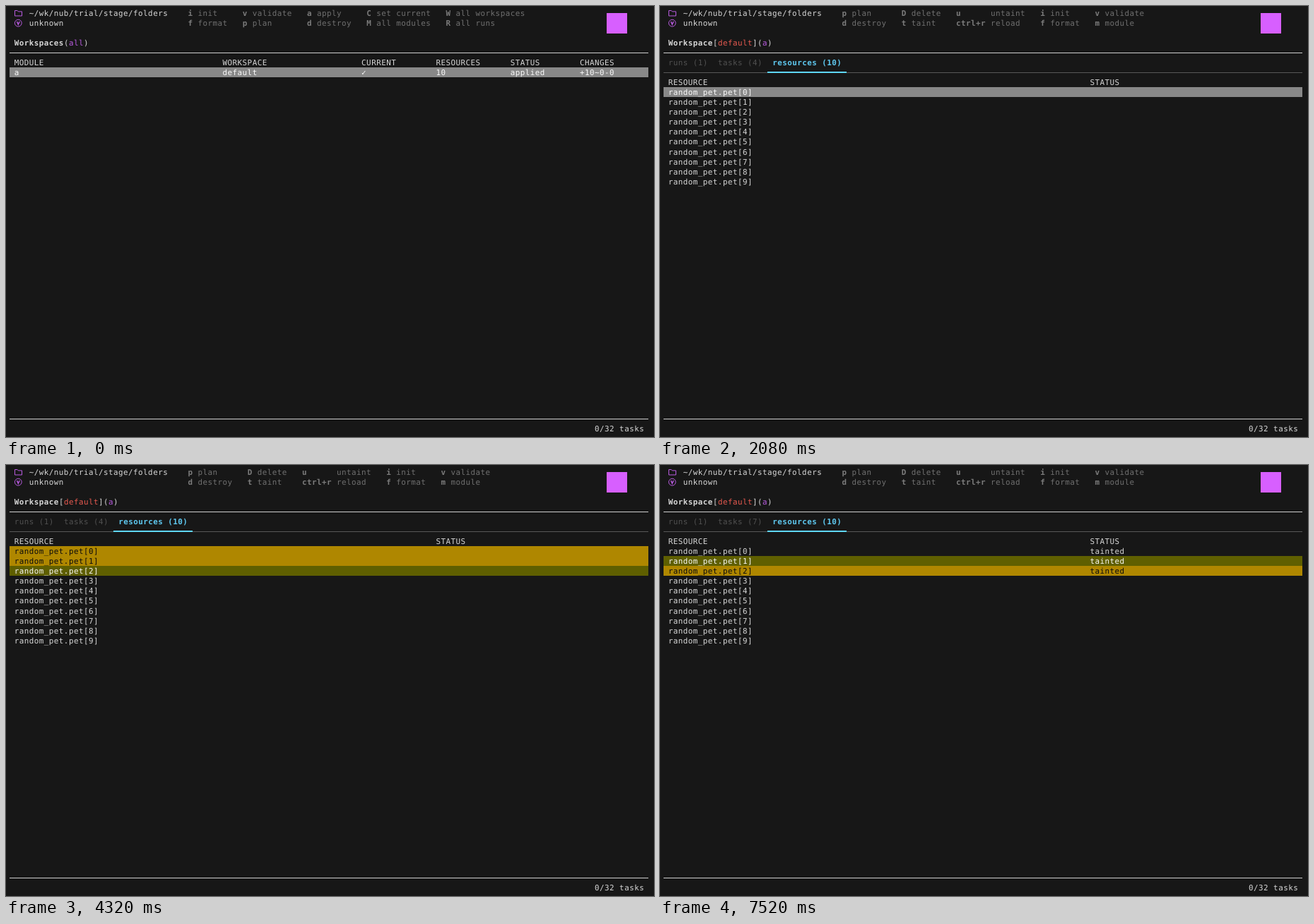
Animation, 917 px wide and 611 px high, one loop 8 s. Source, as an HTML page:

```html
<!DOCTYPE html>
<html lang="en">
<head>
<meta charset="utf-8">
<title>Workspace terminal</title>
<style>
  html, body { margin: 0; width: 100%; height: 100%; overflow: hidden; background: #171717; }
  svg { display: block; }
  text {
    font: 10.9px "DejaVu Sans Mono", "Noto Sans Mono", monospace;
    letter-spacing: 0.458px;
    white-space: pre;
    text-rendering: geometricPrecision;
    font-variant-ligatures: none;
    fill: #d6d6d6;
  }
  rect { shape-rendering: crispEdges; }
  .bold { font-weight: bold; }
  .key { font-weight: bold; fill: #7c7c7c; }
  .help { fill: #707070; }
  .dim { fill: #505050; }
  .tab { font-weight: bold; fill: #5fc9f0; }
  .red { fill: #e85a50; }
  .purple { fill: #b95be0; }
  .white { fill: #fafafa; }
  .black { fill: #0c0c0c; }
  .note { font-weight: bold; fill: #060606; }
</style>
</head>
<body>
<svg id="stage" width="917" height="611" viewBox="0 0 917 611"></svg>
<script>
const LOOP = 8000;
const CELL = 7.02, LINE = 14.03, LEFT = 4.7, TOP = 3;
const GREY = '#888888', OLIVE = '#5f5f00', GOLD = '#af8700';

const x = col => LEFT + col * CELL;
const y = row => TOP + row * LINE;

const text = (col, row, str, cls = '') =>
  `<text x="${x(col).toFixed(2)}" y="${(y(row) + 11.1).toFixed(2)}" class="${cls}">${str}</text>`;
const rect = (left, top, w, h, fill) =>
  `<rect x="${left}" y="${top}" width="${w}" height="${h}" fill="${fill}"/>`;
const bar = (row, fill) => {
  const top = Math.round(y(row));
  return rect(5, top, 904, Math.round(y(row + 1)) - top, fill);
};
const cells = (row, list, cls) => list.map(([col, str]) => text(col, row, str, cls)).join('');

// Each help entry: column, top "key label", bottom "key label", label offset
const HELP = {
  list: [[36, 'i init', 'f format'], [47, 'v validate', 'p plan'], [60, 'a apply', 'd destroy'],
    [72, 'C set current', 'M all modules'], [88, 'W all workspaces', 'R all runs']],
  runs: [[36, 'a apply', 'c cancel'], [47, 'p plan', 'd destroy'], [59, 'i init', 'f format'],
    [70, 'v validate', 'm module'], [83, 'M all modules', 'W all workspaces'],
    [102, 'R all runs', 'T all tasks']],
  tasks: [[36, 'c cancel', 'r retry'], [47, 'i init', 'f format'], [58, 'v validate', 'm module'],
    [71, 'M all modules', 'W all workspaces'], [90, 'R all runs', 'T all tasks']],
  resources: [[36, 'p plan', 'd destroy'], [48, 'D delete', 't taint'],
    [59, 'u untaint', 'ctrl+r reload', 7], [76, 'i init', 'f format'], [87, 'v validate', 'm module']]
};

function help(name) {
  return HELP[name].map(([col, top, bottom, gap = 2]) =>
    [top, bottom].map((item, row) => {
      const cut = item.indexOf(' ');
      return text(col, row, item.slice(0, cut), 'key') +
        text(col + gap, row, item.slice(cut + 1), 'help');
    }).join('')).join('');
}

function frame(s) {
  return rect(0, 0, 917, 611, '#171717') +
    '<g fill="none" stroke="#b95be0"><path d="M12.5 6.5h3.6l1.2 1.4h5.2v6.1h-10z"/>' +
    '<circle cx="17.3" cy="24.2" r="4.9"/><path d="M15.5 22l1.8 4.2L19.1 22" stroke-width="1.5"/></g>' +
    text(4, 0, '~/wk/nub/trial/stage/folders') + text(4, 1, 'unknown') +
    help(s.view) +
    rect(850, 10, 29, 29, '#d75fff') +
    rect(5, 66, 904, 1, '#cfcfcf') + rect(5, 585, 904, 1, '#cfcfcf') +
    (s.note ? text(1, 42, s.note, 'note') : '') +
    text(118, 42, `${s.busy || 0}/32 tasks`);
}

function tabs(s) {
  const [runs, tasks, res] = s.counts;
  const list = [['runs', 1, runs], ['tasks', 11, tasks], ['resources', 22, res]];
  let out = text(1, 3, 'Workspace', 'bold') + text(10, 3, '[') + text(11, 3, 'default', 'red') +
    text(18, 3, '](') + text(20, 3, 'a', 'purple') + text(21, 3, ')') +
    rect(5, 94, 904, 1, '#585858');
  for (const [name, col, n] of list) {
    const label = `${name} (${n})`, on = name === s.view;
    out += text(col, 5, label, on ? 'tab' : 'dim');
    if (on) out += rect(Math.round(x(col - 1)), 93, Math.round((label.length + 2) * CELL), 2, '#5fd7ff');
  }
  return out;
}

// Short pseudo-random ids
function id(kind, seed) {
  const set = 'ABCDEFGHJKLMNPQRSTUVWXYZabcdefghijkmnopqrstuvwxyz23456789';
  let out = kind + '-';
  for (let i = 0; i < 22; i++) {
    seed = (seed * 16807 + 11) % 2147483647;
    out += set[seed % set.length];
  }
  return out;
}

const VIEWS = {
  list: () => text(1, 3, 'Workspaces', 'bold') + text(11, 3, '(') + text(12, 3, 'all', 'purple') +
    text(15, 3, ')') +
    cells(5, [[1, 'MODULE'], [43, 'WORKSPACE'], [71, 'CURRENT'], [86, 'RESOURCES'],
      [101, 'STATUS'], [115, 'CHANGES']]) +
    bar(6, GREY) +
    cells(6, [[1, 'a'], [43, 'default'], [71, '✓'], [86, '10'], [101, 'applied'],
      [115, '+10~0-0']], 'white'),

  runs: s => tabs(s) +
    cells(7, [[1, 'STATUS'], [15, 'CHANGES'], [67, 'AGE'], [79, 'ID']]) +
    (s.counts[0] ? bar(8, GREY) +
      cells(8, [[1, 'applied'], [15, '+10~0-0'], [67, '9s ago'], [79, id('run', 71)]], 'white') : ''),

  tasks: s => tabs(s) +
    cells(7, [[1, 'COMMAND'], [71, 'STATUS'], [85, 'AGE'], [97, 'ID']]) + bar(8, GREY) +
    ['state pull', 'apply', 'plan', 'init'].map((cmd, i) =>
      cells(8 + i, [[1, cmd], [71, 'exited'], [85, `${5 + i * 3}s ago`], [97, id('task', 90 + i * 37)]],
        i ? '' : 'white')).join(''),

  resources: s => {
    let out = tabs(s) + cells(7, [[1, 'RESOURCE'], [86, 'STATUS']]);
    for (let i = 0; i < 10; i++) {
      const here = i === s.cursor, picked = s.picked.includes(i);
      const cls = here ? 'white' : picked ? 'black' : '';
      if (here || picked) out += bar(8 + i, here ? (picked ? OLIVE : GREY) : GOLD);
      out += text(1, 8 + i, `random_pet.pet[${i}]`, cls);
      if (i < s.tainted) out += text(86, 8 + i, 'tainted', cls);
    }
    return out;
  }
};

const DONE = 'completed taint tasks: (3 successful; 0 errored; 0 canceled; 0 uncreated)';

// Each step changes part of the state from its time on
const STEPS = [
  [0, { view: 'list' }],
  [960, { view: 'runs', counts: [0, 0, 0] }],
  [1000, { counts: [1, 4, 10] }],
  [1520, { view: 'tasks' }],
  [2080, { view: 'resources', cursor: 0, picked: [], tainted: 0 }],
  [3120, { picked: [0] }],
  [3640, { cursor: 1 }],
  [3720, { picked: [0, 1] }],
  [4280, { cursor: 2 }],
  [4320, { picked: [0, 1, 2] }],
  [4840, { picked: [], counts: [1, 7, 10], busy: 3 }],
  [4880, { tainted: 1, busy: 2 }],
  [4960, { tainted: 2, busy: 1 }],
  [5000, { tainted: 3, busy: 0, note: DONE }],
  [6880, { picked: [2], note: '' }],
  [7440, { cursor: 1 }],
  [7520, { picked: [1, 2] }]
];

let state = {};
const states = STEPS.map(([, change]) => (state = { ...state, ...change }));
const stage = document.getElementById('stage');
const start = performance.now();
let shown = -1;

function draw(now) {
  const t = Math.max(0, now - start) % LOOP;
  const step = STEPS.filter(([at]) => at <= t).length - 1;
  if (step !== shown) {
    const s = states[step];
    stage.innerHTML = frame(s) + VIEWS[s.view](s);
    shown = step;
  }
  requestAnimationFrame(draw);
}
draw(start);
</script>
</body>
</html>
```
